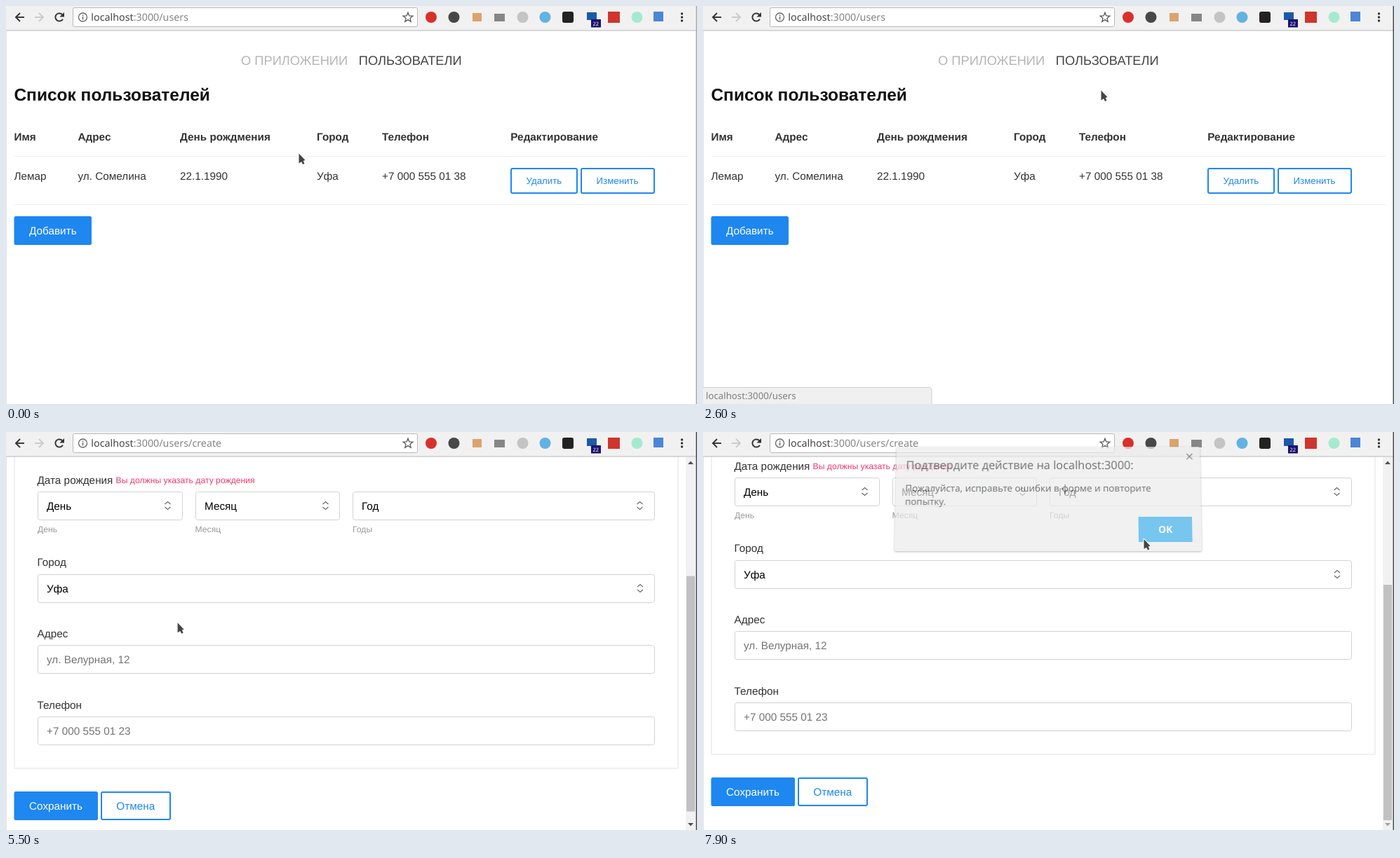
An HTML page with a canvas that plays this animation: 985 by 568 pixels, repeating every 8 s.

```html
<!DOCTYPE html>
<html lang="ru">
<head>
<meta charset="utf-8">
<title>Список пользователей</title>
<style>
html, body { margin: 0; width: 100%; height: 100%; overflow: hidden; background: #fff; }
canvas { display: block; }
</style>
</head>
<body>
<canvas id="stage" width="985" height="568"></canvas>
<script>
const W = 985, H = 568, LOOP = 8000, STEP = 100;
const SANS = '"Liberation Sans", Arial, sans-serif';
const UI = '"Noto Sans", "Open Sans", sans-serif';
const BLUE = '#1e87f0', HOVER = '#4c9ff5', PINK = '#f0386b', DARK = '#333', MUTED = '#999';

const screen = document.getElementById('stage').getContext('2d');
const layer = document.createElement('canvas');
layer.width = W;
layer.height = H;
const overlay = layer.getContext('2d');
let c = screen;

// ---------- helpers ----------
const clamp = v => Math.max(0, Math.min(1, v));
const ease = v => v * v * (3 - 2 * v);
const ramp = (t, a, b) => ease(clamp((t - a) / (b - a)));

// y is the middle of the capital letters
function text(s, x, y, size = 15.3, color = DARK, family = SANS, weight = 400) {
  c.font = `${weight} ${size}px ${family}`;
  c.fillStyle = color;
  c.fillText(s, x, y + size * 0.36);
  return x + c.measureText(s).width;
}

function rect(x, y, w, h, fill) {
  c.fillStyle = fill;
  c.fillRect(x, y, w, h);
}

function box(x, y, w, h, r, fill, stroke, lw = 1) {
  c.beginPath();
  c.roundRect(x, y, w, h, r);
  if (fill) { c.fillStyle = fill; c.fill(); }
  if (stroke) { c.strokeStyle = stroke; c.lineWidth = lw; c.stroke(); }
}

function disc(x, y, r, fill) {
  c.beginPath();
  c.arc(x, y, r, 0, 7);
  c.fillStyle = fill;
  c.fill();
}

function trace(points, close) {
  c.beginPath();
  points.forEach(([x, y]) => c.lineTo(x, y));
  if (close) c.closePath();
}

function line(points, color, lw = 1, close = false) {
  trace(points, close);
  c.strokeStyle = color;
  c.lineWidth = lw;
  c.stroke();
}

function shape(points, fill) {
  trace(points, true);
  c.fillStyle = fill;
  c.fill();
}

// ---------- browser frame ----------
function toolbar(path) {
  rect(0, 0, W, 35, '#f2f1f2');
  rect(0, 34.5, W, 1, '#b9b7b9');
  navArrow(13, 1, '#333');
  navArrow(54, -1, '#cbcbcb');

  c.beginPath();
  c.arc(76, 16, 5.6, 0.5, 5.6);
  c.strokeStyle = '#333';
  c.lineWidth = 2;
  c.stroke();
  shape([[83, 9], [83, 15.5], [76.5, 15.5]], '#333');

  box(95.5, 2.5, 491, 27, 2, '#fff', '#b8b8b8');
  c.beginPath();
  c.arc(109.5, 16, 6, 0, 7);
  c.strokeStyle = '#666';
  c.lineWidth = 1.3;
  c.stroke();
  rect(108.8, 12.5, 1.5, 1.6, '#666');
  rect(108.8, 15, 1.5, 4.4, '#666');
  const x = text('localhost', 121.3, 16, 14.3, '#444', UI);
  text(':3000' + path, x, 16, 14.3, '#848484', UI);

  const star = [];
  for (let i = 0; i < 10; i++) {
    const r = i % 2 ? 3.1 : 7.2, a = i * Math.PI / 5;
    star.push([573 + r * Math.sin(a), 16.5 - r * Math.cos(a)]);
  }
  line(star, '#5a5a5a', 1.3, true);

  disc(606, 16, 8, '#d8302a');
  disc(638.5, 16, 8, '#484848');
  rect(665, 10, 13, 12, '#dba36d');
  rect(696, 11, 15, 11, '#868686');
  disc(736.5, 16, 8, '#c4c4c4');
  disc(768.5, 16, 8, '#62b2e2');
  box(793, 8, 16, 16, 3, '#222');
  rect(828, 9, 14, 11, '#1c5aa6');
  rect(834, 19, 14, 11.5, '#1b1070');
  text('22', 836.6, 25, 7.4, '#fff', UI);
  rect(858, 8, 17, 16, '#cf352c');
  disc(899.5, 16, 8, '#a5ead0');
  rect(923, 8, 14, 14, '#4c86d6');
  for (const y of [11, 16, 21]) disc(963.5, y, 1.7, '#333');
}

function navArrow(x, d, color) {
  line([[x + d, 16], [x + 13 * d, 16]], color, 1.9);
  line([[x + 7 * d, 10], [x + d, 16], [x + 7 * d, 22]], color, 1.9);
}

function scrollbar(pos) {
  rect(969, 36, 14, H - 36, '#f1f1f1');
  rect(970, 50 + 168 * pos, 12, 336, '#c1c1c1');
  shape([[972, 46], [976, 41.5], [980, 46]], pos > 0 ? '#505050' : '#a3a3a3');
  shape([[972, 558], [976, 562.5], [980, 558]], pos < 1 ? '#505050' : '#a3a3a3');
}

function statusBar() {
  box(-2, 544.5, 328, 30, 3, '#f1f0f1', '#cfcfcf');
  text('localhost:3000/users', 4, 556.5, 13.25, '#7d7d7d', UI);
}

// ---------- pages ----------
function menu(x, page, hover) {
  const tint = name => page === name ? '#444' : hover === name ? PINK : '#b5b5b5';
  text('О ПРИЛОЖЕНИИ', x, 77.5, 18.3, tint('about'));
  text('ПОЛЬЗОВАТЕЛИ', x + 167.8, 77.5, 18.3, tint('users'));
}

function heading(s) {
  text(s, 11.4, 126.5, 24.5, '#111', SANS, 700);
}

function button(s, x, y, w, h, size, pad, fill) {
  if (fill) box(x, y, w, h, 2.5, fill);
  else box(x + 1, y + 1, w - 2, h - 2, 2, '#fff', BLUE, 2);
  text(s, x + pad, y + h / 2, size, fill ? '#fff' : BLUE);
}

function usersPage(hover) {
  menu(335, 'users', hover);
  heading('Список пользователей');
  const cols = [
    [11.5, 'Имя', 'Лемар'], [102.5, 'Адрес', 'ул. Сомелина'],
    [248, 'День рождмения', '22.1.1990'], [443, 'Город', 'Уфа'],
    [536, 'Телефон', '+7 000 555 01 38'], [719.3, 'Редактирование', '']
  ];
  for (const [x, head, cell] of cols) {
    text(head, x, 186, 15.3, DARK, SANS, 700);
    text(cell, x, 242.5);
  }
  rect(12, 214, 961, 1, '#eeeeee');
  rect(12, 283, 961, 1, '#eeeeee');
  button('Удалить', 719, 231, 96, 37, 13.3, 22.5, null);
  button('Изменить', 819, 231, 106, 37, 13.3, 22.5, null);
  button('Добавить', 11.5, 300, 110.5, 41, 15.3, 21.5, hover === 'add' ? HOVER : BLUE);
}

function aboutPage(hover) {
  menu(335, 'about', hover);
  heading('О приложении');
}

function field(x, y, w, s, color, focused) {
  box(x + 0.5, y + 0.5, w - 1, 40, 3, '#fff', focused ? BLUE : '#d2d2d2');
  text(s, x + 13, y + 20, 15.3, color);
}

function select(x, y, w, s, cx) {
  field(x, y, w, s, '#000');
  for (const d of [-1, 1]) {
    line([[cx - 4, y + 20 + 2 * d], [cx, y + 20 + 5.5 * d], [cx + 4, y + 20 + 2 * d]], '#666', 1.1);
  }
}

function formPage(t, hover) {
  const pos = ramp(t, 5000, 5600);
  const focused = t >= 4900;
  c.save();
  c.beginPath();
  c.rect(0, 35, W, H);
  c.clip();
  c.translate(0, -Math.round(267 * pos));

  menu(328, 'users', hover);
  line([[29, 168.5], [12, 168.5], [12, 727], [958, 727], [958, 168.5], [214, 168.5]], '#e2e2e2');
  text('НОВЫЙ ПОЛЬЗОВАТЕЛЬ', 44.5, 169.5, 12.2, DARK, SANS, 700);

  text('Имя', 44.5, 213.5);
  text('Имя не может быть пустым', 78.5, 214.5, 12.2, PINK);
  field(45, 230, 880, 'Кленов Клён Кленович', '#757575', focused);
  if (focused && t < 5400) rect(58.5, 242, 1, 17, '#111');

  text('Дата рождения', 44.5, 315);
  text('Вы должны указать дату рождения', 156.5, 316, 12.2, PINK);
  select(45, 332, 207, 'День', 230.5);
  select(270, 332, 206, 'Месяц', 455.5);
  select(494, 332, 431, 'Год', 903.5);
  text('День', 45, 385.5, 12.2, MUTED);
  text('Месяц', 269.5, 385.5, 12.2, MUTED);
  text('Годы', 494, 385.5, 12.2, MUTED);

  text('Город', 44.5, 432.5);
  select(45, 450, 880, 'Уфа', 904);
  text('Адрес', 44.5, 534);
  field(45, 551, 880, 'ул. Велурная, 12', '#757575');
  text('Телефон', 44.5, 636);
  field(45, 653, 880, '+7 000 555 01 23', '#757575');
  button('Сохранить', 11.5, 760, 119.5, 41, 15.3, 21.5, hover === 'save' ? HOVER : BLUE);
  button('Отмена', 135, 760, 100, 41, 15.3, 22.3, null);
  c.restore();
  scrollbar(pos);
}

// ---------- dialog ----------
function dialog(t) {
  const alpha = t < 7200 ? clamp((t - 6500) / 300) : 1 - clamp((t - 7700) * 0.0015);
  if (alpha <= 0) return;
  c = overlay;
  c.clearRect(0, 0, W, H);
  c.save();
  c.shadowColor = 'rgba(0,0,0,.4)';
  c.shadowBlur = 3;
  c.shadowOffsetY = 1;
  box(275, 21, 434, 149, 2, '#ebebec');
  c.restore();
  text('Подтвердите действие на localhost:3000:', 289, 47.5, 16.3, '#3c4043', UI, 500);
  text('Пожалуйста, исправьте ошибки в форме и повторите', 288.5, 80.5, 13.3, '#3c4043', UI);
  text('попытку.', 288.5, 99.5, 13.3, '#3c4043', UI);
  for (const d of [-4, 4]) line([[690, 35 - d], [698, 35 + d]], '#666', 1.4);
  rect(620, 121, 76, 36, t >= 7600 && t < 7700 ? '#2f9fdb' : '#3daee9');
  text('OK', 648, 139, 13.8, '#fff', UI, 700);

  c = screen;
  c.save();
  c.globalAlpha = alpha;
  if (alpha === 1) c.drawImage(layer, 0, 0);
  else {
    // slight backward tilt, row by row
    for (let y = 14; y < 180; y++) {
      const k = 1 + 0.0138 * ((y - 20) / 150 - 0.33);
      c.drawImage(layer, 0, y, W, 1, 492 * (1 - k), y, W * k, 1);
    }
  }
  c.restore();
}

// ---------- pointer ----------
const PATH = [
  [100, 417.5, 210.5], [500, 377, 180], [700, 377, 180], [1400, 394, 77], [1600, 394, 77],
  [2200, 566, 77], [2400, 567, 79], [2600, 567.5, 120.5], [2800, 584, 140], [3400, 71, 322],
  [4000, 71, 322], [4700, 255, 252], [5400, 255, 252], [5700, 215, 330], [5800, 210, 340],
  [6200, 113, 478], [6500, 92, 507], [6700, 92, 507], [7500, 628.5, 153]
];

function pointer(t) {
  const i = PATH.findIndex(p => p[0] > t);
  if (i === 0) return PATH[0].slice(1);
  if (i < 0) return PATH[PATH.length - 1].slice(1);
  const [t0, x0, y0] = PATH[i - 1], [t1, x1, y1] = PATH[i];
  const k = ramp(t, t0, t1);
  return [x0 + (x1 - x0) * k, y0 + (y1 - y0) * k];
}

const ARROW = [[0, 0], [9, 9.5], [6.2, 10.4], [8, 14.6], [5.6, 15.6], [3.6, 11.8], [0, 14]];
const HAND = [[-1, 1.5], [1, 0], [5.2, 4.6], [10, 5.4], [12, 8], [11, 14], [4, 15], [1.5, 12], [-1, 10], [0, 8.6], [3.2, 8.6]];

function drawPointer(x, y, kind) {
  if (kind === 'beam') {
    line([[x, y - 6], [x, y + 6]], '#555', 1.2);
    for (const d of [-6.5, 6.5]) line([[x - 3, y + d], [x + 3, y + d]], '#555', 1.2);
    return;
  }
  c.save();
  c.translate(x, y);
  c.lineJoin = 'round';
  const pts = kind === 'hand' ? HAND : ARROW;
  line(pts, 'rgba(255,255,255,.9)', 2.4, true);
  shape(pts, '#454545');
  c.restore();
}

// ---------- scene ----------
function target(page, x, y, t) {
  const inside = (l, top, r, b) => x >= l && x <= r && y >= top && y <= b;
  if (page === 'create') {
    if (t < 5200) return inside(45, 230, 925, 271) ? 'input' : '';
    return t > 5700 && inside(12, 493, 131, 533) ? 'save' : '';
  }
  if (inside(335, 66, 488, 89)) return 'about';
  if (inside(503, 66, 650, 89)) return 'users';
  return page === 'users' && inside(12, 300, 122, 341) ? 'add' : '';
}

function draw(t) {
  const page = t >= 4100 ? 'create' : t >= 1600 && t < 2400 ? 'about' : 'users';
  const [x, y] = pointer(t);
  const modal = t >= 6600 && t < 7800;
  const over = target(page, x, y, t);
  const hover = modal ? 'save' : over;

  rect(0, 0, W, H, '#fff');
  if (page === 'create') formPage(t, hover);
  else if (page === 'about') aboutPage(hover);
  else usersPage(hover);
  rect(0, 36, 1, H, '#e3e3e3');
  if (t >= 2100 && t < 2800) statusBar();
  toolbar(page === 'create' ? '/users/create' : '/' + page);
  rect(983.5, 0, 1.5, H, t < 1000 ? '#aaabad' : '#4a4d52');
  dialog(t);

  const kind = over === 'input' ? 'beam' : over && t < 6700 ? 'hand' : 'arrow';
  drawPointer(x, y, kind);
}

screen.textRendering = overlay.textRendering = 'geometricPrecision';
const start = performance.now();

function tick() {
  const t = (performance.now() - start) % LOOP;
  draw(Math.floor(t / STEP) * STEP);
  requestAnimationFrame(tick);
}
tick();
</script>
</body>
</html>
```
